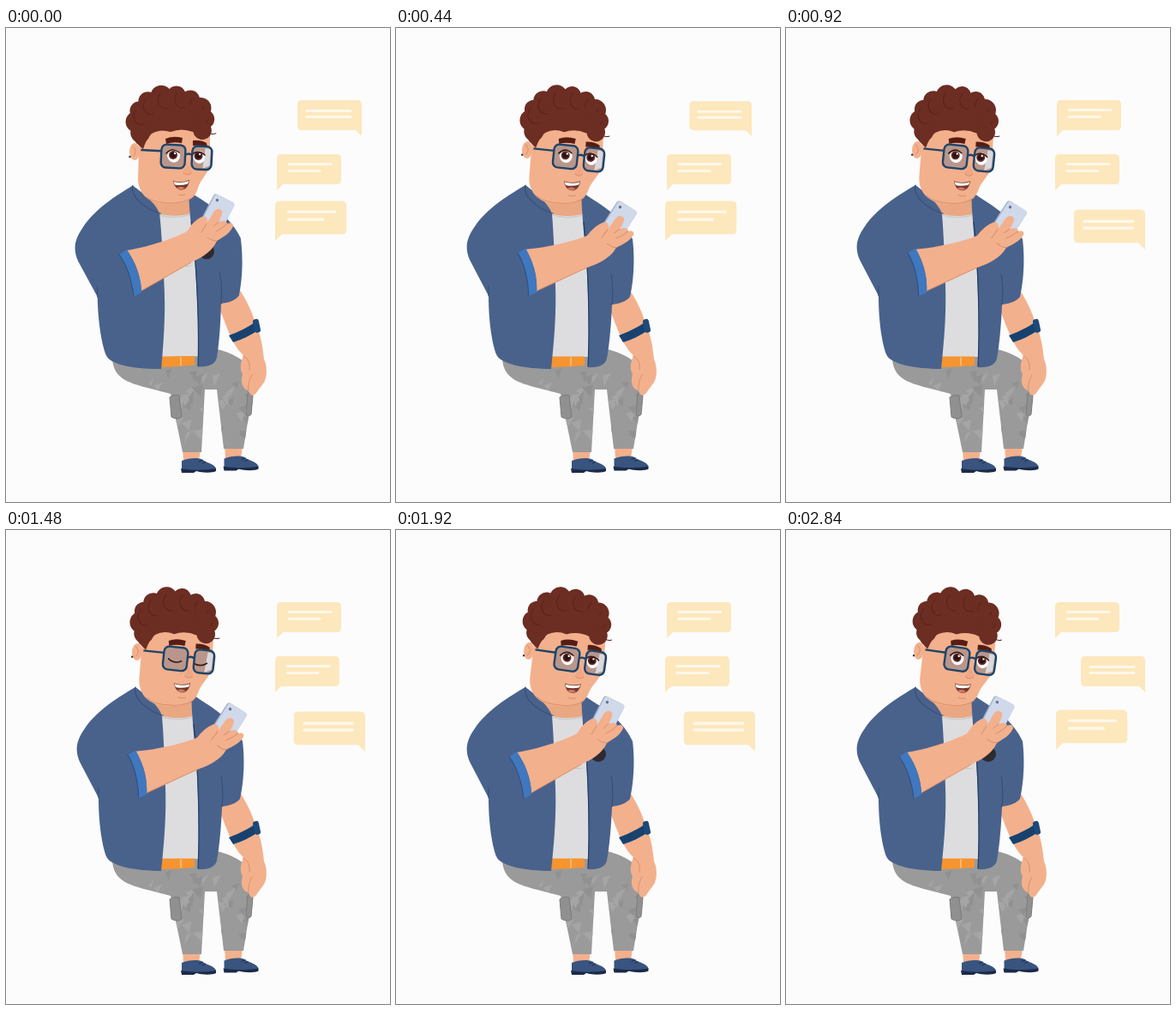
Write an HTML page that moves like this. It is 448 by 552 pixels and loops after 2920 ms.

```html
<!DOCTYPE html>
<html lang="en">
<head>
<meta charset="utf-8">
<title>Man chatting on his phone</title>
<style>
  html, body { margin: 0; width: 100%; height: 100%; overflow: hidden; background: #fcfcfc; }
  svg { display: block; width: 448px; height: 552px; }
  .skin { fill: #f3b08c; }
  .fold { fill: none; stroke: #d98f6c; stroke-linecap: round; }
  .cloth { fill: #49628c; }
  .seam { fill: none; stroke: #36507c; stroke-width: 1.2; stroke-linecap: round; }
  .hair { fill: #6c2d22; }
  .curl { fill: none; stroke: #58231b; stroke-linecap: round; }
  .lash { fill: none; stroke: #3a1915; stroke-width: 1.6; stroke-linecap: round; }
  .frame { fill: none; stroke: #1d4469; stroke-width: 2.4; }
  .lens { fill: #a58e8b; fill-opacity: .75; }
</style>
</head>
<body>
<svg viewBox="0 0 448 552" xmlns="http://www.w3.org/2000/svg">
  <defs>
    <g id="shoe">
      <path fill="#38547f" d="M205 504C212 501 222 500 228 502C232 506 243 507 245 513L244 516H205Z"/>
      <path fill="#1c2a47" d="M204 513C216 515.500 234 515 245 513V516C242 518 233 518 226 517L222 516L219 518H205Z"/>
      <path stroke="#1c2a47" d="M225 505L230 503M229 507L233 505"/>
    </g>
    <path id="pants" d="M124 386C126 408 142 413 165 419L192 426L206 494H228L232 421H246L254 490H277L287 428V400C280 386 262 378 246 374L180 385Z"/>
    <clipPath id="inPants"><use href="#pants"/></clipPath>
  </defs>

  <g id="legs">
    <path class="skin" d="M206 489H227L225 505Q216 508 207 504ZM255 486H276L274 502Q265 504 256 501Z"/>
    <use href="#shoe"/>
    <use href="#shoe" x="49.500" y="-2.500"/>
    <use href="#pants" fill="#9a9a9a"/>
    <g id="camo" clip-path="url(#inPants)"/>
    <path fill="#909090" stroke="#7b7b7b" d="M191 430Q196 426 202 428L205 453Q200 457 193 453ZM282 425Q287 424 288 428L286 450Q282 454 280 450Z"/>
  </g>

  <g id="restingArm">
    <path class="skin" d="M248 318L272 304C280 316 287 330 291 344C298 358 300 376 301 386C305 393 305 408 300 414L294 422C290 430 284 429 283 422C276 421 273 412 276 403C272 397 274 389 277 381C269 374 262 362 249 326Z"/>
    <path class="fold" d="M277 382C283 385 285 391 284 398M283 421C282 414 285 408 287 404"/>
    <path fill="#174270" d="M260 358Q277 352 290 343L294 352Q281 361 265 366Z"/>
    <rect x="289" y="339" width="7" height="16" rx="3" fill="#1d4a78" transform="rotate(-12 292 347)"/>
  </g>

  <g id="torso">
    <path fill="#dddddf" d="M178 212H221L226 290L225 383H180L184 300Z"/>
    <path fill="#f69430" d="M181 382.500H220V393Q200 395 181 395Z"/>
    <path stroke="#fbd9ac" d="M204 383.500V393.500"/>
    <path fill="#e9a782" d="M168 196H220L217 217Q200 221 183 217Z"/>
    <path fill="none" stroke="#c8c8cc" stroke-width="1.200" d="M182 218Q200 223 218 218M204 276Q212 279 218 277"/>
    <path class="cloth" d="M151 183C132 194 106 210 92 231C82 245 80 256 86 270L108 312C108 345 113 370 117 380C121 391 150 397 181 397C185 360 187 330 186 300C185 270 184 240 182 217C180 207 166 194 151 183Z"/>
    <path class="cloth" d="M216 190C232 203 262 215 276 246C279 270 277 296 273 313C268 319 260 321 252 322C251 350 248 376 246 385C244 393 235 396 224 395C226 350 224 300 222 270Q219 240 217 212Z"/>
    <path class="seam" d="M151 183C148 196 164 210 183 216M108 312V300M252 322Q254 302 251 286"/>
    <path class="seam" style="stroke:#223d63" d="M219 226C225 280 226 352 224 394"/>
    <circle cx="236" cy="261" r="9" fill="#2d2b30"/>
  </g>

  <g id="head">
    <ellipse class="skin" cx="150" cy="144" rx="6" ry="10"/>
    <path class="fold" d="M148 138Q154 143 149 149"/>
    <circle cx="144.500" cy="150" r="1.200" fill="#333"/>
    <path class="skin" d="M156 105L154 176C155 198 172 206 192 205C212 204 221 198 224 186C227 176 238 168 238 155V105Z"/>
    <path class="fold" d="M164 197C176 206 207 207 219 196M201 194Q205 196 209 194"/>
    <g class="hair" id="curls">
      <path d="M148 128C140 90 172 74 194 74C224 74 242 92 237 126Q230 118 218 121Q205 116 192 121Q180 117 170 123Q164 128 160 141L152 134Z"/>
    </g>
    <path fill="#551d14" d="M186 129Q195 125 206 128L205 134Q195 132 187 135ZM218 131Q227 130 234 134L235 139Q226 136 218 137Z"/>
    <g transform="rotate(3 195 150)">
      <rect class="lens" x="181" y="136" width="28" height="27" rx="6"/>
      <rect class="lens" x="217" y="136" width="23" height="27" rx="6"/>
      <path fill="#e4eaf1" fill-opacity=".8" d="M232 138L238 139V158L230 162Z"/>
    </g>
    <g id="eyes">
      <path fill="#fff" d="M188 149C190 139 203 139 203 149C202 159 190 159 188 149ZM218 150C220 141 232 141 232 151C231 160 220 160 218 150Z"/>
      <g fill="#612a26"><circle cx="195" cy="148" r="5"/><circle cx="224.500" cy="149" r="5"/></g>
      <g fill="#2b1214"><circle cx="195" cy="148" r="3.200"/><circle cx="224.500" cy="149" r="3.200"/></g>
      <g fill="#fff"><circle cx="197" cy="146" r="1.200"/><circle cx="226" cy="147" r="1.200"/></g>
      <path class="lash" d="M187 146Q194 138 202 145M217 147Q225 141 232 148"/>
    </g>
    <path id="lids" class="lash" d="M187 150Q194 156 202 152M217 154Q225 158 232 153"/>
    <path fill="#f0a884" d="M211 156C213 162 218 164 216 169Q212 173 207 169Q206 166 209 163Z"/>
    <path class="fold" d="M207 169Q212 173 216 169"/>
    <g class="frame" transform="rotate(3 195 150)">
      <rect x="181" y="136" width="28" height="27" rx="6"/>
      <rect x="217" y="136" width="23" height="27" rx="6"/>
      <path d="M209 147Q213 144 217 147M181 144L157 144"/>
    </g>
    <path fill="#74392d" d="M195 178Q204 181 214 177C213 185 209 189 204 188.500C199 188 196 184 195 178Z"/>
    <path fill="#fff" d="M195.500 179Q204 181.500 213.500 178L212 181.500Q204 184 197 182.500Z"/>
    <path fill="#cf7a66" d="M199 186.500Q204 183 209 186.500Q204 190 199 186.500Z"/>
  </g>

  <g id="phoneArm">
    <g transform="rotate(27 249 213)">
      <rect x="234.500" y="197" width="27" height="36" rx="3.500" fill="#a7b5cf"/>
      <rect x="236" y="197" width="25.500" height="35" rx="3.500" fill="#cfd9ea"/>
      <circle cx="241" cy="203" r="1.700" fill="#64748f"/>
    </g>
    <path class="skin" d="M141 259C165 255 194 246 211 237Q218 225 228 220Q235 218 235 226L234 228L243 213Q248 208 252 213Q253 217 248 226Q257 222 258 228Q265 225 265 231C261 240 252 244 246 248C241 259 230 267 216 273L158 306C157 288 151 272 141 259Z"/>
    <path class="fold" d="M258 228Q252 234 245 237M248 226L242 231M246 248Q240 248 235 244M234 228L228 238M158 306L216 273"/>
    <path fill="#3f78bf" d="M132 264L141 258C152 275 158 292 158 308L149 313C147 295 142 278 132 264Z"/>
    <path class="seam" d="M132 264C142 278 147 295 149 313"/>
  </g>

  <g id="chat"/>
</svg>
<script>
const LOOP = 2920;
const part = id => document.getElementById(id);

function add(parent, tag, attrs) {
  const el = document.createElementNS('http://www.w3.org/2000/svg', tag);
  for (const k in attrs) el.setAttribute(k, attrs[k]);
  return parent.appendChild(el);
}

// Smooth 0..1 between two times
function ramp(t, from, to) {
  const p = Math.min(1, Math.max(0, (t - from) / (to - from)));
  return p * p * (3 - 2 * p);
}

// Curls: bumps around an ellipse, each with a crease running inwards
const CURLS = 10;
for (let i = 0; i < CURLS; i++) {
  const a = (-208 + 230 * i / (CURLS - 1)) * Math.PI / 180;
  const at = k => `${192 + 40 * k * Math.cos(a)} ${108 + 30 * k * Math.sin(a)}`;
  const [cx, cy] = at(1).split(' ');
  add(part('curls'), 'circle', { cx, cy, r: 11.5 + Math.sin(i * 2) });
  if (i > 1 && i < CURLS - 1)
    add(part('curls'), 'path', { class: 'curl', d: `M${at(1.1)}q-6 9 1 16q4 3 8 1` });
}

// Camouflage: seeded triangles
let seed = 7;
const rnd = (lo, hi) => {
  seed = seed * 16807 % 2147483647;
  return lo + (hi - lo) * seed / 2147483647;
};
for (let i = 0; i < 44; i++) {
  const d = `M${rnd(165, 285)} ${rnd(392, 482)}l${rnd(6, 14)} ${rnd(-8, 0)}l${rnd(-9, 0)} ${rnd(8, 16)}z`;
  add(part('camo'), 'path', { d, fill: i % 2 ? '#a5a5a5' : '#919191' });
}

// Every CYCLE ms a message arrives at the bottom, the others move up and the top one leaves
const CYCLE = 1600, ARRIVE = 680, TOP = 126, MID = 189, WIDE = 1.11;
const messages = [
  { x: 415 }, { x: 316 }, { x: 314, low: 248 }, { x: 419, low: 258 }, { x: 315, low: 256 }
];

// A bubble is drawn around the tip of its tail
messages.forEach((m, i) => {
  const right = m.x > 400;
  m.born = ARRIVE + CYCLE * (i - 3);
  m.el = add(part('chat'), 'g', {});
  add(m.el, 'path', {
    fill: '#fde7bd', transform: `scale(${right ? -1 : 1} 1)`,
    d: 'M0 0V-37Q0 -42 5 -42H70Q75 -42 75 -37V-12Q75 -7 70 -7H7Z'
  });
  add(m.el, 'path', {
    fill: 'none', stroke: '#fff8ea', 'stroke-width': 3, 'stroke-linecap': 'round',
    d: right ? 'M-64 -29.500H-13M-64 -22.500H-13' : 'M14 -30.500H63M14 -22.500H50'
  });
});

function drawMessage({ el, x, low = MID, born }, t) {
  const first = born + CYCLE, second = first + CYCLE - 70, leave = born + 3 * CYCLE - 260;
  const up1 = ramp(t, first, first + 220), up2 = ramp(t, second, second + 220);
  const y = low + (MID - low) * up1 + (TOP - MID) * up2;
  const size = ramp(t, born, born + 160) * (WIDE + (1 - WIDE) * up1) * (1 - ramp(t, leave, leave + 200));
  el.setAttribute('transform', `translate(${x} ${y}) scale(${size})`);
}

function turn(id, deg, px, py, dx = 0, dy = 0) {
  part(id).setAttribute('transform', `translate(${dx} ${dy}) rotate(${deg} ${px} ${py})`);
}

function draw(t) {
  const out = ramp(t, 120, 440), back = ramp(t, 1600, 1900);
  const reach = out - back;
  const closed = ramp(t, 1400, 1440) - ramp(t, 1540, 1580);
  turn('torso', 0.9 * (out - 1) - 2 * Math.sin(Math.PI * back), 185, 390);
  turn('head', 3 * out + 2 * back, 190, 200);
  turn('phoneArm', 5 * reach, 146, 286, 8 * reach, -reach);
  part('eyes').setAttribute('opacity', 1 - closed);
  part('lids').setAttribute('opacity', closed);
  messages.forEach(m => drawMessage(m, t));
}

function tick() {
  draw(performance.now() % LOOP);
  requestAnimationFrame(tick);
}
tick();
</script>
</body>
</html>
```
